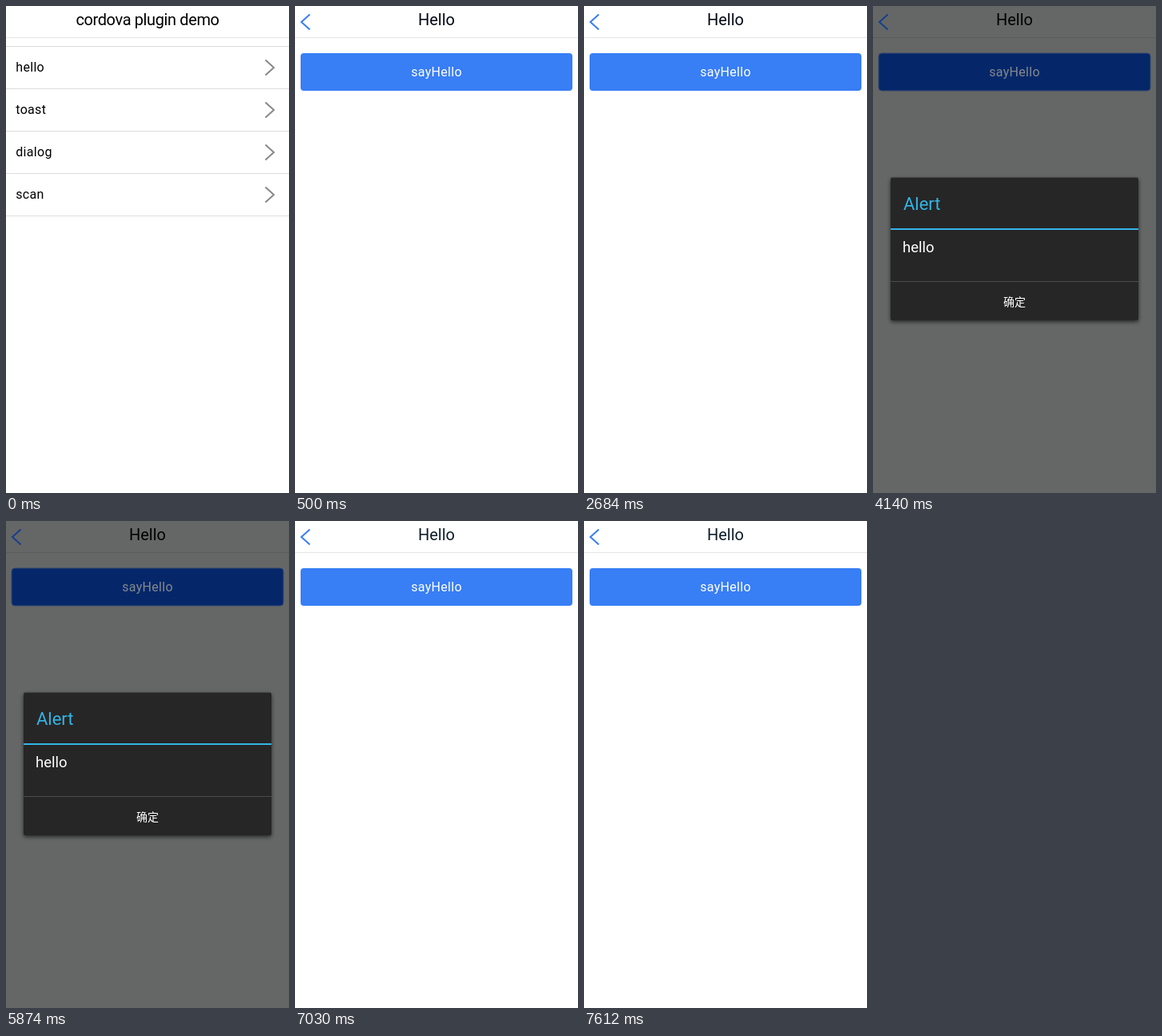
Recreate the animation shown at these times as an HTML page. Size 354 px wide and 609 px high, loop 8 s.

```html
<!DOCTYPE html>
<html lang="en">
<head>
<meta charset="utf-8">
<title>Plugin demo</title>
<style>
  html, body { margin: 0; width: 100%; height: 100%; overflow: hidden; background: #fff; }
  svg { display: block; width: 100%; height: 100%; font-family: Roboto, sans-serif; }
  .title { font-size: 20px; text-anchor: middle; }
  .body { font-size: 16px; letter-spacing: .3px; }
  .rule { stroke: #ddd; }
  .chevron { fill: none; stroke-width: 2; }
</style>
</head>
<body>
<svg id="stage" viewBox="0 0 354 609">
  <defs>
    <filter id="shadow" x="-10%" y="-10%" width="120%" height="125%">
      <feDropShadow dx="0" dy="2" stdDeviation="2.5" flood-color="#000" flood-opacity=".65"/>
    </filter>
  </defs>
  <rect id="back" width="354" height="609"/>
  <path id="headRule" d="M0 39.5H354"/>

  <g id="menu">
    <text class="title" x="177" y="24" letter-spacing="-.38">cordova plugin demo</text>
    <path class="rule" d="M0 50.5H354"/>
  </g>

  <g id="page">
    <path id="arrow" class="chevron" d="M18.5 10.5L8 20L18.5 29.5"/>
    <text id="heading" class="title" x="177" y="24">Hello</text>
    <rect id="button" x="7" y="59" width="340" height="47" rx="4"/>
    <text id="label" class="body" x="177" y="88" text-anchor="middle">sayHello</text>
  </g>

  <g id="dialog">
    <rect x="22" y="214.5" width="310" height="178.5" rx="2" fill="#282828" filter="url(#shadow)"/>
    <text x="38" y="255" font-size="22" fill="#33b5e5">Alert</text>
    <rect x="22" y="278" width="310" height="2" fill="#33b5e5"/>
    <text x="37" y="308" font-size="18.5" fill="#fff">hello</text>
    <path d="M22 344.5H332" stroke="#4b4b4b"/>
    <text x="177" y="375" font-size="14" fill="#fff" text-anchor="middle"
      lang="zh-CN" style="font-family:'Noto Sans CJK SC','Noto Sans CJK',sans-serif">确定</text>
  </g>
</svg>
<script>
  const LOOP = 8000, OPEN = 500, ALERT = 4140, CLOSE = 7030;
  const el = id => document.getElementById(id);

  const bright = {
    back: '#fff', rule: '#e6e6e6', arrow: '#387ef5', heading: '#000814',
    button: '#387ef5', edge: 'none', label: '#fff'
  };
  const dimmed = {
    back: '#656766', rule: '#5b5d5c', arrow: '#163f8c', heading: '#000',
    button: '#05276a', edge: '#34466f', label: '#85898c'
  };
  const closed = { ...bright, heading: '#0b1c29' };

  el('menu').innerHTML += ['hello', 'toast', 'dialog', 'scan'].map((name, i) => `
    <g transform="translate(0 ${i * 53})">
      <text class="body" x="12.3" y="82">${name}</text>
      <path class="chevron" stroke="#888" d="M324.5 67.5L335 77L324.5 86.5"/>
      <path class="rule" d="M0 103.5H354"/>
    </g>`).join('');

  function show(id, on) {
    el(id).setAttribute('display', on ? 'inline' : 'none');
  }

  function paint(theme) {
    for (const id of ['back', 'heading', 'button', 'label']) el(id).setAttribute('fill', theme[id]);
    el('headRule').setAttribute('stroke', theme.rule);
    el('arrow').setAttribute('stroke', theme.arrow);
    el('button').setAttribute('stroke', theme.edge);
  }

  function render(t) {
    const alerting = t >= ALERT && t < CLOSE;
    show('menu', t < OPEN);
    show('page', t >= OPEN);
    show('dialog', alerting);
    paint(alerting ? dimmed : t >= CLOSE ? closed : bright);
  }

  function tick() {
    render(performance.now() % LOOP);
    requestAnimationFrame(tick);
  }
  tick();
</script>
</body>
</html>
```
